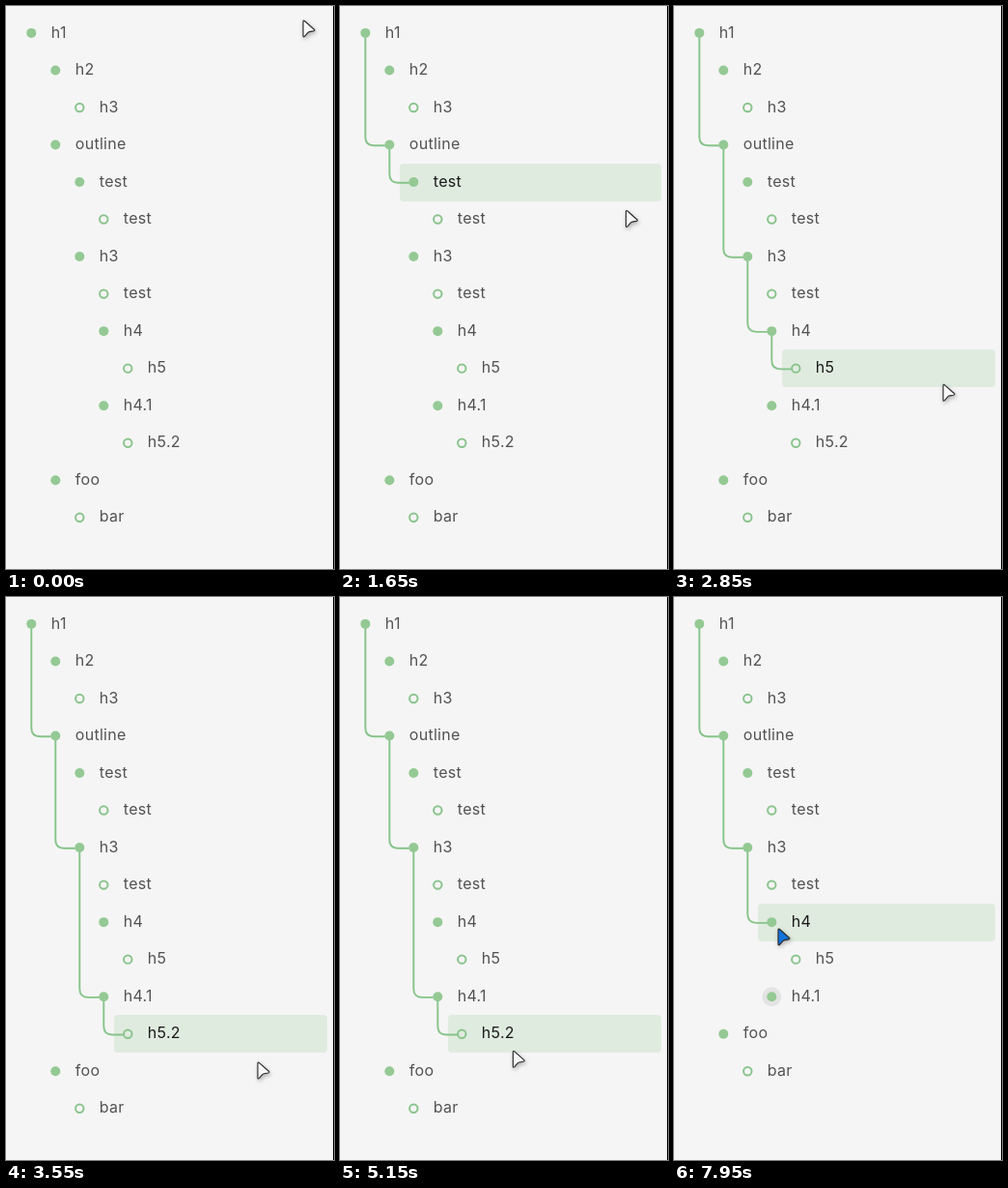
Recreate the animation shown at these times as an HTML page. Size 340 px wide and 582 px high, loop 8000 ms.

```html
<!DOCTYPE html>
<html lang="en">
<head>
<meta charset="utf-8">
<title>Outline</title>
<style>
  html, body { margin: 0; width: 100%; height: 100%; overflow: hidden; background: #f5f5f5; }
  svg { display: block; width: 340px; height: 582px; }
  text { font: 16px Inter, "Open Sans", sans-serif; letter-spacing: .28px; fill: #525252; }
  .on text { fill: #1a1a1a; }
  .bullet { fill: #94c994; }
  .leaf { fill: none; stroke: #8ac48d; stroke-width: 2; }
  .halo { fill: #000; opacity: 0; }
  #bar { fill: #e0ebdf; }
  #thread { fill: none; stroke: #86c48a; stroke-width: 1.9; }
  #cursor { filter: drop-shadow(1px 2px 2px rgba(0, 0, 0, .28)); }
  #cursor path { stroke: #2c2c2c; stroke-width: 1.15; stroke-linejoin: round; }
</style>
</head>
<body>
<svg viewBox="0 0 340 582">
  <rect width="340" height="582" fill="#f5f5f5"/>
  <rect id="bar" height="39" rx="4"/>
  <path id="thread"/>
  <g id="rows"></g>
  <rect x="339" width="1" height="582" fill="#000"/>
  <g id="cursor"><path d="M1 2.2Q1 .2 2.6 1.5L12.4 10.2Q13.6 11.5 11.8 11.9L7.6 12.6Q6.5 12.8 5.8 13.6L2.6 17.3Q1 18.7 1 16.6Z"/></g>
</svg>
<script>
const LOOP = 8000, FOLD = 6400, PITCH = 38.53;
const $ = id => document.getElementById(id);

// Label and depth of each row
const rows = [
  ['h1', 0], ['h2', 1], ['h3', 2], ['outline', 1], ['test', 2], ['test', 3], ['h3', 2],
  ['test', 3], ['h4', 3], ['h5', 4], ['h4.1', 3], ['h5.2', 4], ['foo', 1], ['bar', 2]
].map(([label, depth]) => ({ label, depth, x: 26.3 + 25 * depth }));
const folded = rows[10], hidden = rows[11];

// Cursor stops: time, x, y
const stops = [
  [0, 307, 14], [300, 306, 20], [600, 304.5, 31], [850, 302, 55], [1150, 299.5, 134],
  [1700, 295, 218], [2150, 290.5, 290], [2550, 284, 353], [3400, 265, 456],
  [3550, 260, 480], [4150, 236, 523], [4800, 236, 523], [5150, 178.5, 468.5],
  [5600, 125, 430], [5950, 107, 423.5], [7300, 107, 423.5], [7950, 107, 342], [8000, 107, 342]
];

function make(tag, attrs, parent) {
  const el = document.createElementNS('http://www.w3.org/2000/svg', tag);
  for (const key in attrs) el.setAttribute(key, attrs[key]);
  return parent.appendChild(el);
}

rows.forEach((row, i) => {
  row.parent = rows.slice(0, i).reverse().find(r => r.depth < row.depth);
  const isLeaf = !(rows[i + 1] && rows[i + 1].depth > row.depth);
  row.el = make('g', {}, $('rows'));
  if (row === folded) row.halo = make('circle', { class: 'halo', cx: row.x, r: 10 }, row.el);
  make('circle', { class: isLeaf ? 'leaf' : 'bullet', cx: row.x, r: isLeaf ? 4.2 : 5 }, row.el);
  make('text', { x: row.x + 20.5, y: 4.6 }, row.el).textContent = row.label;
});

// Monotone cubic through the stops, so rests stay still
function slope(i, k) {
  const rate = j => (stops[j + 1][k] - stops[j][k]) / (stops[j + 1][0] - stops[j][0]);
  if (i === 0 || i === stops.length - 1) return 0;
  const a = rate(i - 1), b = rate(i);
  return a * b <= 0 ? 0 : 2 * a * b / (a + b);
}

function track(t, k) {
  let i = 0;
  while (i < stops.length - 2 && t >= stops[i + 1][0]) i++;
  const [a, b] = [stops[i], stops[i + 1]], h = b[0] - a[0], u = (t - a[0]) / h, v = 1 - u;
  return a[k] * (1 + 2 * u) * v * v + b[k] * u * u * (3 - 2 * u)
    + h * u * v * (slope(i, k) * v - slope(i + 1, k) * u);
}

function hovered(list, x, y) {
  let row = list.find(r => Math.abs(y - r.y) <= PITCH / 2);
  while (row && x < row.x - 14) row = row.parent;
  return row;
}

function threadTo(row) {
  let d = '';
  for (let r = row; r && r.parent; r = r.parent) {
    const { x, y } = r.parent, end = r.y + 0.7;
    d += `M${x} ${y}V${end - 9}Q${x} ${end} ${x + 9} ${end}H${r.x - 4.5}`;
  }
  return d;
}

function draw(t) {
  const isFolded = t >= FOLD;
  const list = rows.filter(r => !(isFolded && r === hidden));
  list.forEach((r, i) => {
    r.y = 27.9 + PITCH * i;
    r.el.setAttribute('transform', `translate(0 ${r.y.toFixed(2)})`);
  });
  hidden.el.style.display = isFolded ? 'none' : '';
  folded.halo.style.opacity = 0.07 * Math.min(1, Math.max(0, (t - FOLD) / 200));

  const x = track(t, 1), y = track(t, 2), hotX = x - 6, hotY = y - 11;
  const row = hovered(list, hotX, hotY);
  rows.forEach(r => r.el.classList.toggle('on', r === row));
  $('thread').setAttribute('d', threadTo(row));
  $('bar').style.display = row ? '' : 'none';
  if (row) {
    const left = Math.round(row.x - 14);
    $('bar').setAttribute('x', left);
    $('bar').setAttribute('y', Math.round(row.y - 19.5));
    $('bar').setAttribute('width', 333 - left);
  }

  const onBullet = list.some(r => Math.hypot(hotX - r.x, hotY - r.y) < 13);
  $('cursor').setAttribute('transform', `translate(${x.toFixed(2)} ${y.toFixed(2)})`);
  $('cursor').setAttribute('fill', onBullet ? '#1273de' : '#f8f8f8');
}

const start = performance.now();
function tick() {
  draw((performance.now() - start) % LOOP);
  requestAnimationFrame(tick);
}
tick();
</script>
</body>
</html>
```
